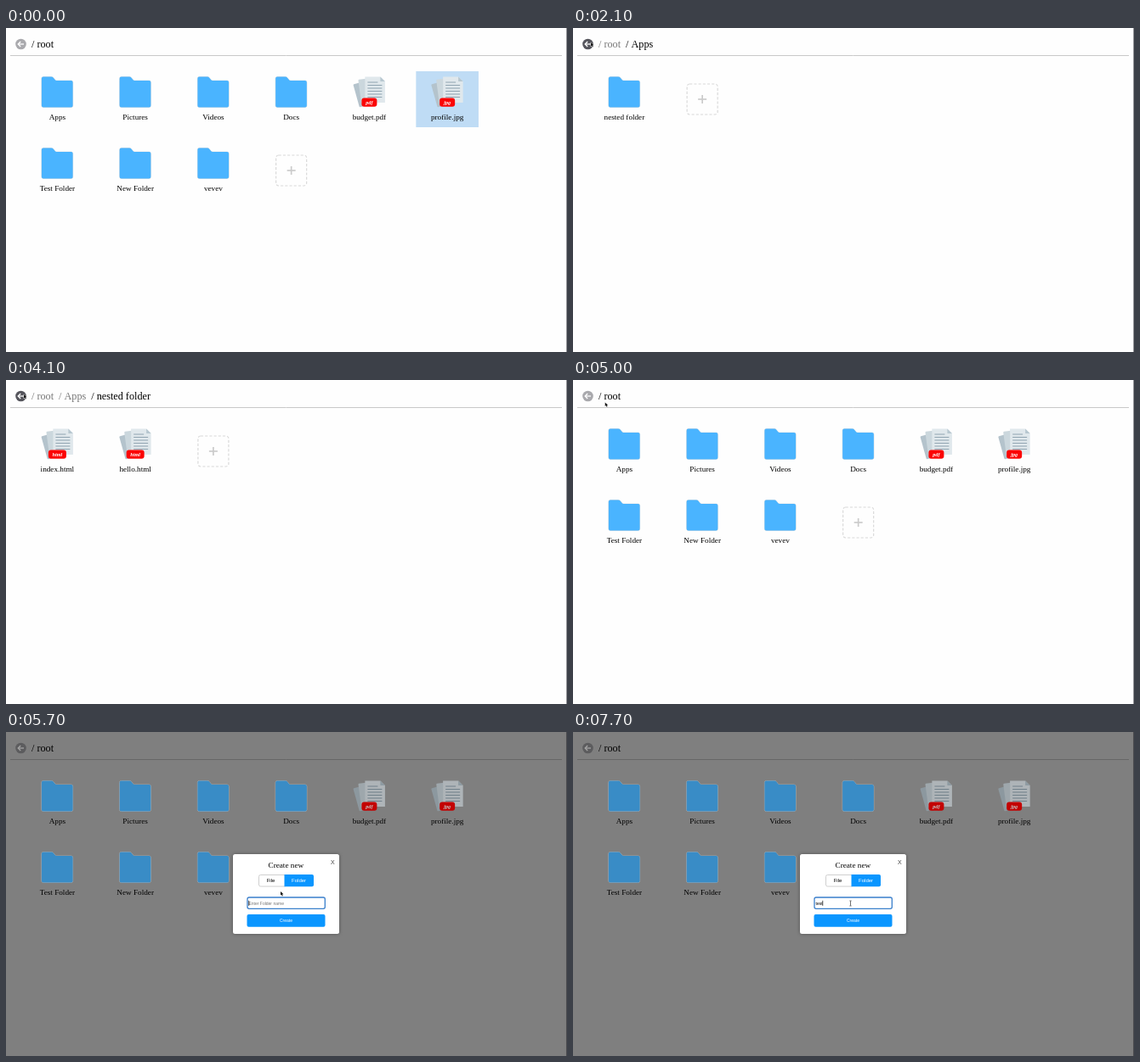
An HTML page with a canvas that plays this animation: 660 px wide and 382 px high, repeating every 8000 ms.

```html
<!DOCTYPE html>
<html lang="en">
<head>
<meta charset="utf-8">
<title>File explorer</title>
<style>
  html, body { margin: 0; width: 100%; height: 100%; overflow: hidden; background: #fefefe; }
  canvas { display: block; width: 660px; height: 382px; }
</style>
</head>
<body>
<canvas></canvas>
<script>
const W = 660, H = 382, LOOP = 8000, STEP = 100;
const SERIF = '"Liberation Serif", Times, serif';
const SANS = '"Liberation Sans", Arial, sans-serif';
const BLUE = '#0a96ff';
const canvas = document.querySelector('canvas');
const ctx = canvas.getContext('2d');
const ratio = window.devicePixelRatio || 1;
canvas.width = W * ratio;
canvas.height = H * ratio;

const folders = {
  root: {
    path: ['root'],
    items: ['Apps', 'Pictures', 'Videos', 'Docs', 'budget.pdf', 'profile.jpg',
            'Test Folder', 'New Folder', 'vevev']
  },
  apps: { path: ['root', 'Apps'], items: ['nested folder'] },
  nested: { path: ['root', 'Apps', 'nested folder'], items: ['index.html', 'hello.html'] }
};

// [start time, value]
const visits = [
  [0, 'root'], [900, 'apps'], [1400, 'nested'], [2100, 'apps'], [2400, 'root'],
  [3300, 'apps'], [3700, 'nested'], [4400, 'apps'], [4800, 'root']
];
const typed = [[0, ''], [6900, 't'], [7000, 'te'], [7200, 'tes'], [7400, 'test']];
const MODAL_AT = 5700;

// [time, x, y]
const pointer = [
  [0, 515, 85], [600, 74, 82], [1300, 74, 82], [1400, 77, 81], [1500, 77, 81],
  [1900, 21, 17], [2400, 21, 17], [2800, 48, 31], [3000, 53.5, 35.5],
  [3200, 66, 80], [3800, 66, 80], [4100, 21, 17], [4900, 21, 17],
  [5600, 323, 188], [5800, 323, 188], [6400, 326.5, 202]
];

const valueAt = (list, t) => list.findLast(([start]) => start <= t)[1];

function pointerAt(t) {
  const i = pointer.findLastIndex(([start]) => start <= t);
  const [t0, x0, y0] = pointer[i];
  const [t1, x1, y1] = pointer[i + 1] || [LOOP, x0, y0];
  const k = (t - t0) / (t1 - t0), e = k * k * (3 - 2 * k);
  return { x: x0 + (x1 - x0) * e, y: y0 + (y1 - y0) * e };
}

function box(x, y, w, h, radius, fill, stroke, lineWidth = 1) {
  ctx.beginPath();
  ctx.roundRect(x, y, w, h, radius);
  if (fill) { ctx.fillStyle = fill; ctx.fill(); }
  if (stroke) { ctx.strokeStyle = stroke; ctx.lineWidth = lineWidth; ctx.stroke(); }
}

function line(color, width, ...points) {
  ctx.beginPath();
  points.forEach(([x, y]) => ctx.lineTo(x, y));
  ctx.strokeStyle = color;
  ctx.lineWidth = width;
  ctx.stroke();
}

function label(text, x, y, font, color = '#000', align = 'center') {
  ctx.font = font;
  ctx.fillStyle = color;
  ctx.textAlign = align;
  ctx.fillText(text, x, y);
}

function drawHeader(path, dim) {
  const atRoot = path.length === 1;
  ctx.beginPath();
  ctx.arc(17.5, 19, 6.3, 0, 7);
  ctx.fillStyle = dim ? '#5c5c5e' : atRoot ? '#a9a9ad' : '#55555c';
  ctx.fill();
  const arrow = dim ? '#a4a4a4' : '#fff';
  line(arrow, 1.3, [14.3, 19], [21, 19]);
  line(arrow, 1.3, [17.2, 16], [14.2, 19], [17.2, 22]);

  const font = '12.2px ' + SERIF;
  let x = 30;
  path.forEach((name, i) => {
    const text = '/ ' + name;
    label(text, x, 23, font, i === path.length - 1 ? '#000' : '#777', 'left');
    x += ctx.measureText(text).width + 6;
  });
  line(dim ? '#666' : '#c9c9c9', 1, [5, 32.5], [654, 32.5]);
}

// Icons are drawn around the tile's top centre.
function drawFolder() {
  const shape = new Path2D('M-18.5 8.5q0-2 2-2h9.5q1.4 0 2.2 1l2 2.6q.8 1 2 1h17q2 0 2 2' +
    'v27.4q0 2-2 2h-32.7q-2 0-2-2z');
  ctx.strokeStyle = '#d9dde0';
  ctx.lineWidth = 1;
  ctx.stroke(shape);
  ctx.fillStyle = '#4ab4ff';
  ctx.fill(shape);
}

function drawSheet(x, y, angle, fill) {
  ctx.save();
  ctx.translate(x, y);
  ctx.rotate(angle);
  box(0, 0, 18, 28, 1, fill);
  ctx.restore();
}

function drawFile(type) {
  drawSheet(-19, 15.5, -0.27, '#b4c3cc');
  drawSheet(-13, 10, -0.13, '#cbd7dd');
  ctx.fillStyle = '#e0e8ec';
  ctx.fill(new Path2D('M-5 6.5h18l5.5 5.5v25h-23.5z'));
  ctx.fillStyle = '#b7c7d0';
  ctx.fill(new Path2D('M13 6.5l5.5 5.5h-5.5z'));
  for (let i = 0; i < 6; i++) {
    const y = 13 + i * 3.5;
    line('#8fa3b0', 1, [-2, y], [i ? 15 : 10, y]);
  }
  const width = type === 'html' ? 21 : 18;
  box(-width / 2, 31.5, width, 10.2, 3, '#fb0505');
  label(type, 0, 38.6, 'italic bold 6.2px ' + SERIF, '#fff');
}

function drawAdd(hovered) {
  ctx.setLineDash([3.2, 2]);
  box(-18, 15, 36, 36, 3, hovered ? '#fefefe' : null, '#dadada', 1.2);
  ctx.setLineDash([]);
  line('#cbcbcb', 1.7, [-5, 33], [5, 33]);
  line('#cbcbcb', 1.7, [0, 28], [0, 38]);
}

function drawTile(name, index, mouse, dim) {
  const cx = 60.4 + (index % 6) * 91.75;
  const top = 51 + Math.floor(index / 6) * 84;
  const hovered = !dim && Math.abs(mouse.x - cx) < 36.8 && mouse.y > top && mouse.y < top + 66;
  if (hovered) box(cx - 36.8, top, 73.6, 66, 0, '#bfdcf5');
  ctx.save();
  ctx.translate(cx, top);
  if (dim) ctx.filter = 'brightness(0.78)';
  if (!name) drawAdd(hovered);
  else if (name.includes('.')) drawFile(name.split('.')[1]);
  else drawFolder();
  ctx.restore();
  if (name) label(name, cx, top + 57, '9.2px ' + SERIF);
}

function drawModal(text) {
  ctx.save();
  ctx.shadowColor = 'rgba(0,0,0,.35)';
  ctx.shadowBlur = 4 * ratio;
  box(267, 144, 125, 94, 2.5, '#fff');
  ctx.restore();
  label('Create new', 329.3, 160, '9.2px ' + SERIF);
  label('X', 384.3, 156, '7px ' + SANS, '#444');

  box(297.5, 168.5, 31, 13.5, [2, 0, 0, 2], '#fff', '#c4c4c4', 0.8);
  box(327.5, 168, 34.5, 14.3, [0, 2, 2, 0], BLUE);
  label('File', 311.5, 177.3, '6px ' + SANS);
  label('Folder', 344.6, 177.3, '6px ' + SANS, '#fff');

  box(284, 195, 91.3, 13.3, 2, '#fff', '#3a7fcb', 1.3);
  label(text || 'Enter Folder name', 285.5, 203.6, '5px ' + SANS, text ? '#000' : '#757575', 'left');
  const caret = 285.7 + (text ? ctx.measureText(text).width : 0);
  line('#000', 0.7, [caret, 198.8], [caret, 204.8]);

  box(283.5, 215, 92, 14.8, 2, BLUE);
  label('Create', 329.5, 224.2, '5px ' + SANS, '#fff');
}

function drawPointer({ x, y }, overInput) {
  if (overInput) {
    line('#333', 0.7, [x, y - 2.8], [x, y + 2.8]);
    line('#333', 0.6, [x - 1.2, y - 3], [x + 1.2, y - 3]);
    line('#333', 0.6, [x - 1.2, y + 3], [x + 1.2, y + 3]);
    return;
  }
  ctx.save();
  ctx.translate(x, y);
  const shape = new Path2D('M0 0v4.6l1.1-1 .8 1.8 .9-.4-.8-1.7h1.5z');
  ctx.strokeStyle = '#fff';
  ctx.lineWidth = 0.8;
  ctx.stroke(shape);
  ctx.fillStyle = '#111';
  ctx.fill(shape);
  ctx.restore();
}

function draw(t) {
  const mouse = pointerAt(t);
  const modal = t >= MODAL_AT;
  const { path, items } = folders[valueAt(visits, t)];
  ctx.setTransform(ratio, 0, 0, ratio, 0, 0);
  box(0, 0, W, H, 0, modal ? '#7f7f7f' : '#fefefe');
  line(modal ? '#4c4c50' : '#96969a', 1, [659.5, 0], [659.5, H]);
  drawHeader(path, modal);
  [...items, null].forEach((name, i) => drawTile(name, i, mouse, modal));
  if (modal) drawModal(valueAt(typed, t));
  if (t > 0) drawPointer(mouse, modal && mouse.y > 195);
}

const begin = performance.now();
function tick() {
  const t = (performance.now() - begin) % LOOP;
  draw(Math.floor(t / STEP) * STEP);
  requestAnimationFrame(tick);
}
tick();
</script>
</body>
</html>
```
